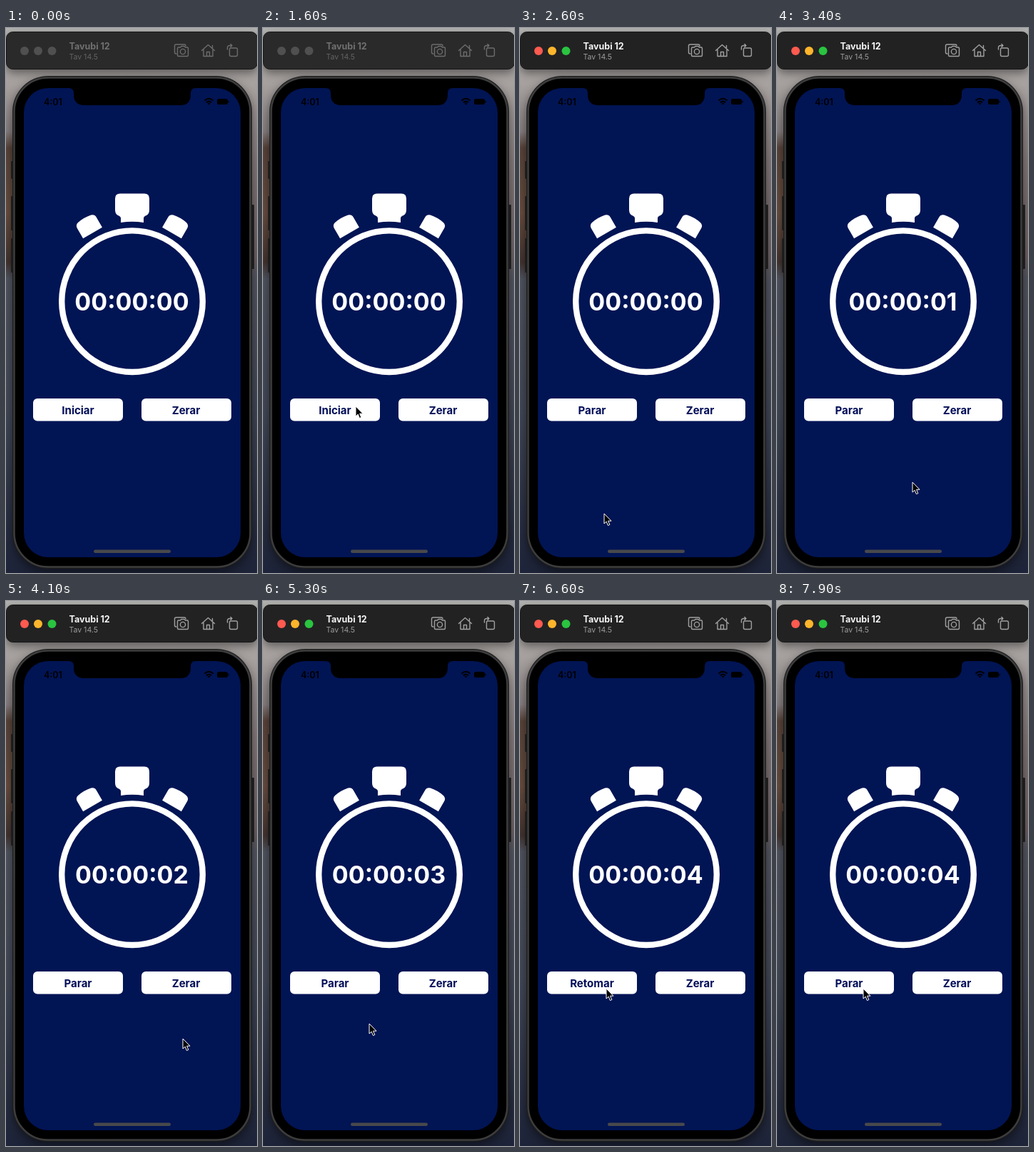
An HTML page that plays this animation: 352 by 762 pixels, repeating every 8 s.

```html
<!DOCTYPE html>
<html lang="pt">
<head>
<meta charset="utf-8">
<title>Cronômetro</title>
<style>
  html, body { margin: 0; width: 100%; height: 100%; overflow: hidden; background: #20242f; }
  svg { display: block; width: 352px; height: 762px; font-family: Inter, sans-serif; }
  #bar { --bar: #2a2a2b; --title: #707070; --sub: #636363; --icon: #6c6c6c; --r: #505050; --y: #505050; --g: #505050; }
  #bar.active { --bar: #222223; --title: #f5f5f5; --sub: #9c9c9c; --icon: #a0a0a0; --r: #fe5a50; --y: #fdb52b; --g: #2ac440; }
  .icon { fill: none; stroke: var(--icon); stroke-width: 1.4; stroke-linejoin: round; stroke-linecap: round; }
  .label { font-size: 15px; font-weight: 650; fill: #020e58; text-anchor: middle; }
  .shadow { filter: drop-shadow(0 5px 7px #0007); }
</style>
</head>
<body>
<svg viewBox="0 0 352 762">
  <defs>
    <linearGradient id="left" x2="0" y2="1">
      <stop offset="0" stop-color="#b4b5b3"/><stop offset=".09" stop-color="#aaa5a3"/>
      <stop offset=".19" stop-color="#857d7f"/><stop offset=".22" stop-color="#58433a"/>
      <stop offset=".34" stop-color="#664c3e"/><stop offset=".43" stop-color="#42332f"/>
      <stop offset=".46" stop-color="#505460"/><stop offset=".7" stop-color="#424857"/>
      <stop offset="1" stop-color="#1d2338"/>
    </linearGradient>
    <linearGradient id="right" x2="0" y2="1">
      <stop offset="0" stop-color="#b4b5b3"/><stop offset=".09" stop-color="#aaa5a3"/>
      <stop offset=".25" stop-color="#84797a"/><stop offset=".42" stop-color="#6b5f63"/>
      <stop offset=".46" stop-color="#535661"/><stop offset=".7" stop-color="#414656"/>
      <stop offset="1" stop-color="#1d2338"/>
    </linearGradient>
    <path id="knob" d="M-15.500 0V-16.500Q-15.500-21.500-10.500-22.800Q0-25 10.500-22.800Q15.500-21.500 15.500-16.500V0Z"/>
  </defs>

  <rect width="176" height="762" fill="url(#left)"/>
  <rect x="176" width="176" height="762" fill="url(#right)"/>

  <g id="bar">
    <rect class="shadow" x=".5" y="5.500" width="352" height="52" rx="9" fill="var(--bar)" stroke="#171717"/>
    <circle cx="26" cy="32" r="6" fill="var(--r)"/>
    <circle cx="45" cy="32" r="6" fill="var(--y)"/>
    <circle cx="64.500" cy="32" r="6" fill="var(--g)"/>
    <text x="88.500" y="30" font-size="12.500" font-weight="700" fill="var(--title)">Tavubi 12</text>
    <text x="88.500" y="44" font-size="10.500" fill="var(--sub)">Tav 14.5</text>
    <g class="icon">
      <path d="M239 36H238.500Q236.500 36 236.500 34V25Q236.500 23 238.500 23H250Q252 23 252 25"/>
      <path d="M242 27H244.500L246 25.500H250L251.500 27H254Q255.500 27 255.500 28.500V38Q255.500 39.500 254 39.500H242Q240.500 39.500 240.500 38V28.500Q240.500 27 242 27Z"/>
      <circle cx="248" cy="33" r="3.600"/>
      <path d="M274.500 31.500L283.500 23.500L292.500 31.500M289.500 28V24.500M277 30V39.500H290V30M281.500 39V33.500H285.500V39"/>
      <rect x="313.500" y="28" width="11" height="11.500" rx="2"/>
      <path d="M310.500 30V27.500Q310.500 24.500 314 24.500H316.500M315 22.500L317 24.500L315 26.500"/>
    </g>
  </g>

  <g fill="#252525">
    <rect x="7" y="186" width="4" height="25" rx="1"/>
    <rect x="7" y="235" width="4" height="48" rx="1"/>
    <rect x="7" y="294" width="4" height="48" rx="1"/>
    <rect x="343" y="247" width="5" height="90" rx="1"/>
  </g>
  <rect class="shadow" x="9" y="67" width="336" height="689" rx="50" fill="#1c1c1c"/>
  <rect x="11.500" y="69.500" width="331" height="684" rx="47.500" stroke="#3d3d3d" stroke-width="2.500"/>
  <rect x="25" y="84" width="304" height="656" rx="34" fill="#011454"/>
  <path d="M88 83H266V84Q259 84 259 91V93Q259 108 244 108H110Q95 108 95 93V91Q95 84 88 84Z"/>

  <text x="53" y="107.500" font-size="12.500" font-weight="600">4:01</text>
  <g fill="none" stroke="#000" stroke-width="2">
    <path d="M278.500 101.500Q284.500 96 290.500 101.500M281 104.200Q284.500 101 288 104.200"/>
  </g>
  <path d="M282.500 105.500Q284.500 104 286.500 105.500L284.500 107.500Z"/>
  <rect x="296" y="99" width="15" height="8" rx="2.500"/>
  <rect x="311.500" y="101.500" width="1.200" height="3" rx=".6"/>

  <g fill="#fff">
    <path d="M160 231.500H194Q201 231.500 201 238.500V254Q201 260 197 262Q193 263.500 193 266V272Q177 269.500 161 272V266Q161 263.500 157 262Q153 260 153 254V238.500Q153 231.500 160 231.500Z"/>
    <use href="#knob" transform="translate(121.500 286.500) rotate(-30)"/>
    <use href="#knob" transform="translate(232.500 286.500) rotate(30)"/>
    <circle cx="177" cy="382.200" r="98.800" fill="none" stroke="#fff" stroke-width="8.400"/>
    <text id="clock" x="176.500" y="395" font-size="34" font-weight="650" text-anchor="middle"></text>
    <rect x="38" y="518" width="126" height="31.500" rx="6"/>
    <rect x="190" y="518" width="126" height="31.500" rx="6"/>
  </g>
  <text id="toggle" class="label" x="101" y="539.500"></text>
  <text class="label" x="252.500" y="539.500">Zerar</text>
  <rect x="123" y="729.500" width="108" height="4.500" rx="2.200" fill="#49494b"/>

  <path id="cursor" d="M0 0V14L3.200 11.100L5.400 16.500L7.800 15.500L5.600 10.200H10Z" stroke="#fff" stroke-linejoin="round"/>
</svg>
<script>
  const LOOP = 8000, STEP = 100;
  const START = 1700, SECOND = 1000;
  // time, x, y of the pointer tip
  const path = [
    [800, 165, 764], [1100, 215, 580], [1300, 132, 585], [1500, 130, 529], [1800, 130, 529],
    [2500, 118, 679], [2600, 118, 679], [2700, 120, 660], [3600, 210, 628], [4100, 248, 612],
    [4300, 262, 608], [4500, 259, 612], [4800, 259, 612], [5300, 149, 591], [5700, 124, 567],
    [6100, 121, 542], [LOOP, 121, 542]
  ];
  const $ = id => document.getElementById(id);

  function pointerAt(t) {
    if (t <= path[0][0]) return path[0].slice(1);
    const i = path.findIndex(p => p[0] >= t);
    const [t0, x0, y0] = path[i - 1], [t1, x1, y1] = path[i];
    const k = (t - t0) / (t1 - t0);
    return [x0 + (x1 - x0) * k, y0 + (y1 - y0) * k];
  }

  function toggleLabel(t) {
    if (t < 1800) return 'Iniciar';
    return t >= 6400 && t < 7800 ? 'Retomar' : 'Parar';
  }

  function draw(now) {
    const t = Math.floor(now % LOOP / STEP) * STEP;
    const seconds = Math.min(4, Math.max(0, Math.floor((t - START) / SECOND)));
    $('bar').setAttribute('class', t >= START ? 'active' : '');
    $('clock').textContent = '00:00:0' + seconds;
    $('toggle').textContent = toggleLabel(t);
    $('cursor').setAttribute('transform', `translate(${pointerAt(t)})`);
  }

  const origin = performance.now();
  function tick() {
    draw(performance.now() - origin);
    requestAnimationFrame(tick);
  }
  tick();
</script>
</body>
</html>
```
